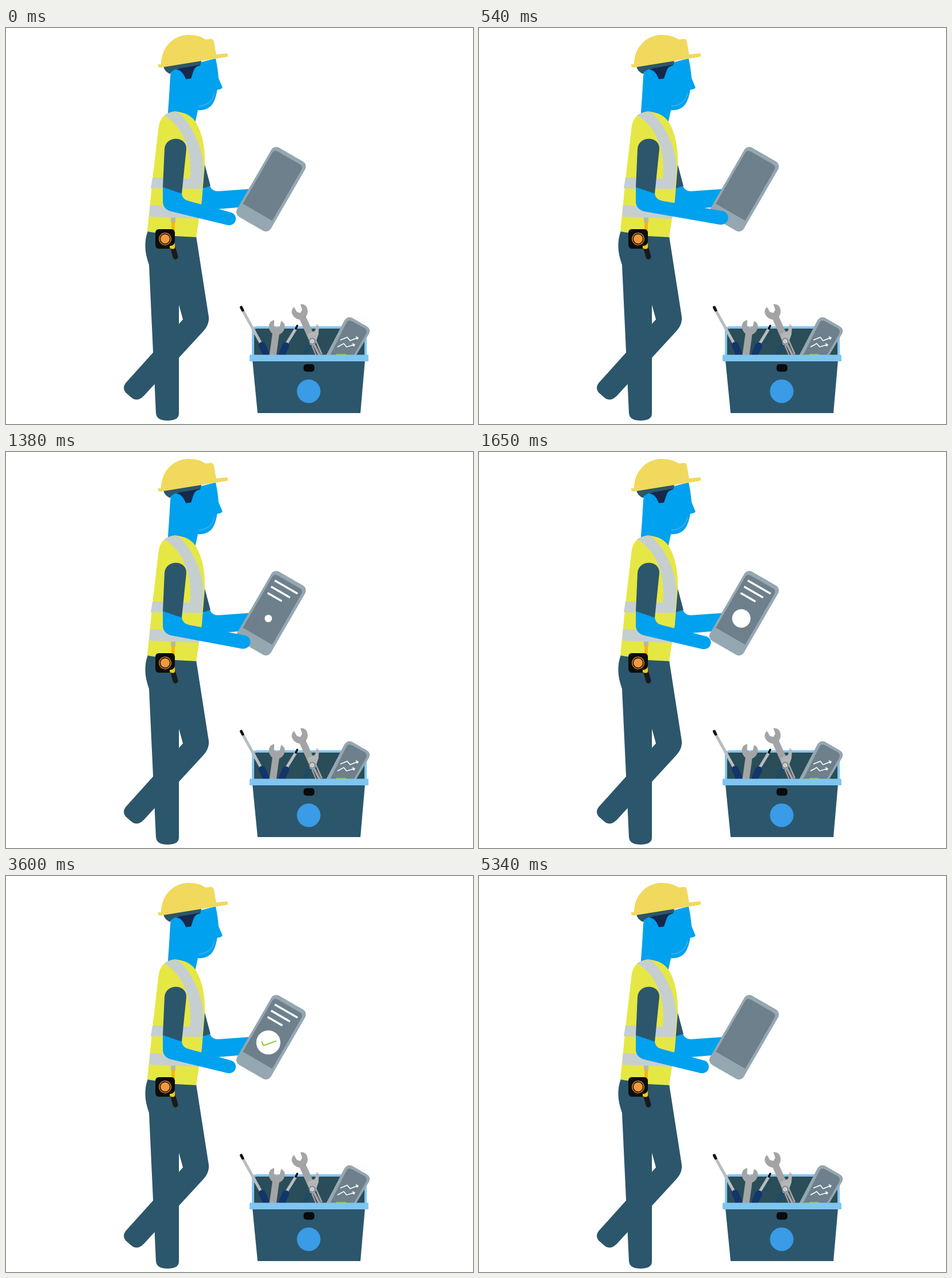
An HTML page without scripts for the animation above (5.4 s loop, 813 px wide and 689 px high).

```html
<!DOCTYPE html>
<html lang="en">
<head>
<meta charset="utf-8">
<title>Technician with tablet</title>
<style>
  html, body { margin: 0; width: 100%; height: 100%; overflow: hidden; background: #fff; }
  svg { display: block; width: 100%; height: 100%; }
  .navy { fill: #2c566b; }
  .skin { fill: #00a1ee; }
  .vest { fill: #e5e744; }
  .band { fill: #c6cfd0; }
  .body { fill: #95a7b1; }
  .screen { fill: #6d808c; }
  .steel { fill: #a3a4a6; }
  .line { fill: none; stroke: #fff; }
  .draw { stroke-dasharray: 1 2; stroke-dashoffset: 1; }
  .shaft { stroke: #b9bdc0; stroke-width: 5; }
  .tip { stroke: #111; stroke-width: 5; stroke-linecap: round; }
  .grip { stroke: #12356b; stroke-width: 12; stroke-linecap: round; }
  .thin { stroke-width: 3.5; }
</style>
</head>
<body>
<svg viewBox="0 0 813 689" preserveAspectRatio="none">
  <defs>
    <path id="wrench" class="steel" d="M-6 95 V24 Q-14 19 -14 9 Q-13 2 -6 0 L-5 10 L0 14 L5 10 L6 0 Q13 2 14 9 Q14 19 6 24 V95 Z"/>
    <clipPath id="inBox"><path d="M400 470 H640 V572 H400 Z"/></clipPath>
  </defs>

  <!-- legs -->
  <path class="navy" d="M290 358 L331 362 L353 503 Q354 516 344 527 L240 640 Q228 652 217 642 L208 634 Q202 626 208 618 L308 507 L300 478 Z"/>
  <path class="navy" d="M247 353 Q237 380 249 412 L261 670 Q262 683 281 683 Q301 683 301 671 L301 355 Z"/>

  <!-- head -->
  <path class="skin" d="M286 84 Q287 72 297 70 L365 53 Q369 72 370 87 L377 104 Q373 108 368 107 L366 116 C362 133 354 144 334 143 L329 166 L281 160 Q284 122 286 84 Z"/>
  <path d="M335 136 C350 135 360 127 363 113" fill="none" stroke="#35aeee" stroke-width="2"/>
  <path d="M296 72 L340 56 L338 65 Q328 67 326 76 L322 88 L313 89 Q307 73 296 72 Z" fill="#14294c"/>
  <path class="navy" d="M274 67 L340 56 L338 64 L298 71 Q289 73 286 80 Q276 76 274 67 Z"/>
  <path d="M270 63 C270 34 291 12 318 12 C331 12 341 15 347 20 L358 19 Q361 20 362 25 L366 46 L385 44 Q387 46 386 50 L367 53 L268 69 Q263 67 265 63 Z" fill="#f0d95c"/>

  <!-- far arm -->
  <path class="skin" d="M338 278 L355 275 Q359 284 369 284 L426 280 L406 312 L370 315 L336 312 Z"/>
  <path class="navy" d="M344 230 L356 275 L338 280 Z"/>

  <!-- vest -->
  <path class="vest" d="M266 170 Q270 148 294 145 Q319 147 330 163 C343 185 347 212 346 238 L341 300 L331 364 L294 362 L246 354 L256 255 Z"/>
  <path class="band" d="M255 260 L320 262 C326 207 303 167 275 152 Q285 145 299 146 C322 165 343 205 344 245 L341 280 L252 279 Z"/>
  <path class="band" d="M251 308 L340 315 L336 332 L249 328 Z"/>

  <!-- tape measure -->
  <path d="M287 330 H295 V338 H287 Z" fill="#b8b6a4"/>
  <path d="M288 337 H294 V352 H288 Z" fill="#f3b71b"/>
  <path d="M291 384 L295 398" stroke="#17191c" stroke-width="9" stroke-linecap="round"/>
  <rect x="260" y="350" width="34" height="34" rx="6" fill="#0d0d0f"/>
  <path d="M285 379 Q292 379 294 373 V383 Q290 386 285 383 Z" fill="#f6c713"/>
  <circle cx="277" cy="367" r="10.2" fill="none" stroke="#c97a2c" stroke-width="1.6"/>
  <circle cx="277" cy="367" r="8" fill="#f1993d"/>

  <!-- handheld tablet -->
  <g transform="translate(461.5 280.5) rotate(30)">
    <rect class="body" x="-34" y="-69.5" width="68" height="139" rx="10"/>
    <path class="screen" d="M-30 46.5 V-55 Q-30 -62.5 -22 -62.5 H21 Q29 -62.5 29 -55 V46.5 Z"/>
    <g class="line" stroke-width="3.5">
      <path class="draw" pathLength="1" d="M-23 -52.5 H23">
        <animate attributeName="stroke-dashoffset" dur="5.4s" repeatCount="indefinite" values="1;1;0;0;1;1" keyTimes="0;.1722;.2139;.7074;.7444;1"/>
      </path>
      <path class="draw" pathLength="1" d="M-23 -40 H15">
        <animate attributeName="stroke-dashoffset" dur="5.4s" repeatCount="indefinite" values="1;1;0;0;1;1" keyTimes="0;.1944;.2352;.6889;.7259;1"/>
      </path>
      <path class="draw" pathLength="1" d="M-23 -27.5 H7">
        <animate attributeName="stroke-dashoffset" dur="5.4s" repeatCount="indefinite" values="1;1;0;0;1;1" keyTimes="0;.2167;.2574;.6667;.7037;1"/>
      </path>
    </g>
  </g>
  <circle cx="456.7" cy="289.6" r="0" fill="#fff">
    <animate attributeName="r" dur="5.4s" repeatCount="indefinite" values="0;0;16;27;21;21;27;19.5;15.5;0;0" keyTimes="0;.2222;.3056;.3444;.3778;.7778;.8056;.85;.8833;.9889;1"/>
  </circle>
  <path class="draw" pathLength="1" d="M445 288 L448.5 295 L470.5 287" fill="none" stroke="#97c83c" stroke-width="2.2">
    <animate attributeName="stroke-dashoffset" dur="5.4s" repeatCount="indefinite" values="1;1;0;0;1;1" keyTimes="0;.3944;.5;.7833;.8296;1"/>
  </path>

  <!-- near arm -->
  <path class="skin" d="M273 276 L273 303 Q274 315 287 319 L386 343 C402 345 405 325 392 321 L318 301 Q306 298 306 286 Z">
    <animate attributeName="d" dur="5.4s" repeatCount="indefinite" calcMode="spline"
      keyTimes="0;.1278;.2056;.3333;1" keySplines=".42 0 .58 1;0 0 1 1;.42 0 .58 1;0 0 1 1"
      values="M273 276 L273 303 Q274 315 287 319 L386 343 C402 345 405 325 392 321 L318 301 Q306 298 306 286 Z;
              M273 276 L273 303 Q274 315 287 319 L422 342 C441 343 442 321 427 318 L320 301 Q306 298 306 286 Z;
              M273 276 L273 303 Q274 315 287 319 L422 342 C441 343 442 321 427 318 L320 301 Q306 298 306 286 Z;
              M273 276 L273 303 Q274 315 287 319 L386 343 C402 345 405 325 392 321 L318 301 Q306 298 306 286 Z;
              M273 276 L273 303 Q274 315 287 319 L386 343 C402 345 405 325 392 321 L318 301 Q306 298 306 286 Z"/>
  </path>
  <path class="navy" d="M273 277 L276 210 C278 187 314 187 314 210 L306 288 Z"/>

  <!-- toolbox -->
  <rect x="430" y="521" width="196" height="56" rx="6" fill="#294d59" stroke="#82c6f0" stroke-width="4"/>
  <g clip-path="url(#inBox)">
    <path class="shaft" d="M412 491 L444 549"/>
    <path class="tip" d="M409.5 486 L412 491"/>
    <path class="grip" d="M446 552 L452 566"/>
    <use href="#wrench" transform="translate(473 509) rotate(8)"/>
    <path class="shaft" d="M504 524 L488 550" stroke-width="4"/>
    <path class="tip thin" d="M507 518 L504.5 523"/>
    <path class="grip" d="M487 553 L481 566"/>
    <use href="#wrench" transform="translate(507 483) rotate(-24)"/>
    <path d="M531 548 L517 572 M536 548 L546 572" stroke="#1d4a66" stroke-width="7"/>
    <path d="M537 552 L547 572" stroke="#b59d96" stroke-width="4"/>
    <path d="M525 532 L538 527 L541 515 L545 519 L544 533 L537 553 L529 551 Z" fill="#b5b5b5"/>
    <circle cx="533" cy="545" r="5" fill="#c9cacb" stroke="#75787b" stroke-width="1.5"/>
    <path class="body" d="M556 572 L589 509 Q594 501 602 504 L628 519 Q636 524 632 532 L608 572 Z"/>
    <path class="screen" d="M563 572 L592 514 Q595 507 602 510 L624 522 Q630 526 627 532 L604 572 Z"/>
    <g class="line" stroke-width="1.5">
      <path d="M582 543 L594 538 L599 544 L612 539 M609 537 L613 539 L611 542"/>
      <path d="M577 555 L588 549 L593 555 L606 551 M603 549 L607 551 L605 554"/>
    </g>
    <path d="M575 569 H592" stroke="#8dc63f" stroke-width="4"/>
  </g>
  <path class="navy" d="M429 578 H625 L617 670 H438 Z"/>
  <rect x="424" y="568.5" width="207" height="11.5" rx="1.5" fill="#7fc5f0"/>
  <rect x="518" y="585" width="19" height="13" rx="5" fill="#080a0c"/>
  <circle cx="527" cy="632" r="20.5" fill="#3a9be6"/>
</svg>
</body>
</html>
```
